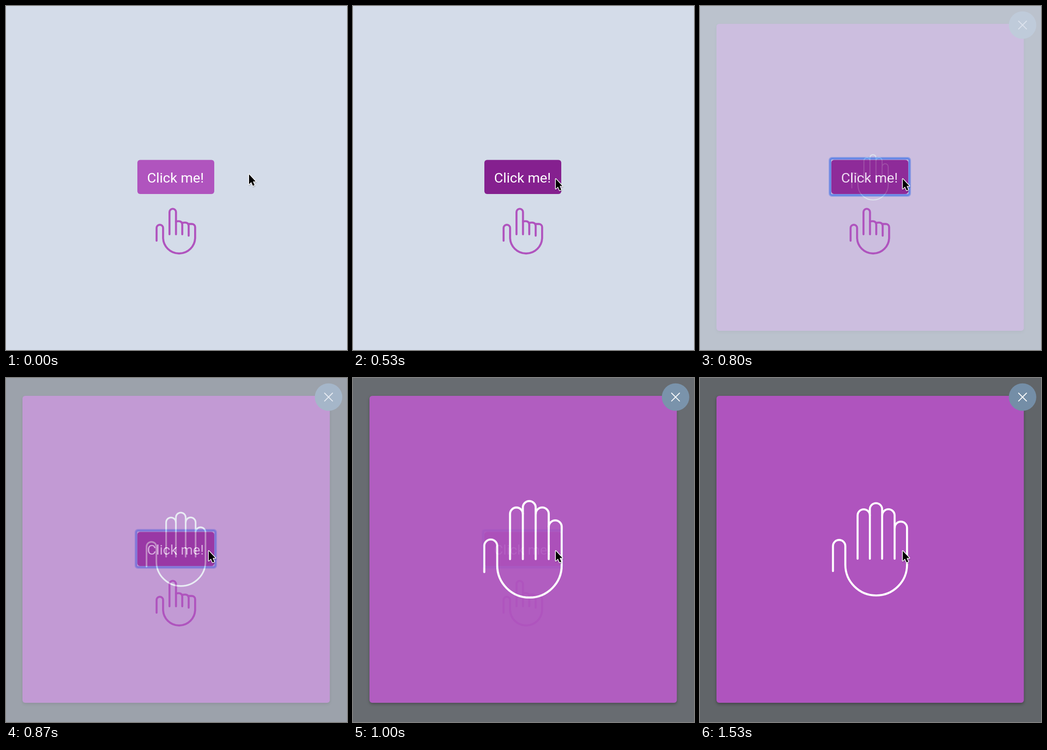
An HTML page that plays this animation: 745 px wide and 752 px high, repeating every 1.74 s.

```html
<!DOCTYPE html>
<html lang="en">
<head>
<meta charset="utf-8">
<title>Click me</title>
<style>
  html, body { margin: 0; width: 100%; height: 100%; overflow: hidden; background: #d4dce9; }
  svg { display: block; width: 745px; height: 752px; }
  .line { fill: none; stroke-linecap: round; stroke-linejoin: round; }
  #modal { filter: drop-shadow(0 3px 3px rgba(0, 0, 0, .32)); }
  #label { font: 400 30.4px Roboto, sans-serif; fill: #fff; }
</style>
</head>
<body>
<svg viewBox="0 0 745 752">
  <rect width="745" height="752" fill="#d4dce9"/>

  <g id="ring" class="line">
    <rect x="284" y="333" width="174" height="81" rx="4" stroke="#478ff2" stroke-opacity=".5" stroke-width="6"/>
    <rect x="284.5" y="333.5" width="173" height="80" rx="4" stroke="#478ff2" stroke-opacity=".85" stroke-width="3.4"/>
  </g>
  <rect id="button" x="287" y="336.5" width="168" height="74.5" rx="6"/>
  <text id="label" x="308.3" y="386">Click me!</text>

  <g class="line" stroke="#b054be" stroke-width="4.4">
    <path d="M329 513V485.3a7.1 7.1 0 0 1 14.2 0V506a35 35 0 0 0 70 0V483.5a7 7 0 0 0-7-7h-6.5"/>
    <path d="M357.2 499V450.5a7.1 7.1 0 0 1 14.2 0V499"/>
    <path d="M371.5 471c8-1.6 13.6 0 13.6 7V499"/>
    <path d="M385.5 474c8-1.6 13.6 0 13.6 7V502"/>
  </g>

  <g id="overlay">
    <rect width="745" height="752" fill="#616569"/>
    <rect id="modal" x="36" y="39" width="671.5" height="671" rx="6" fill="#af54be"/>
    <g id="hand" class="line" stroke="#fff" stroke-width="4.4">
      <path d="M290.5 422V367.5a13.5 13.5 0 0 1 27 0V408a67.4 67.4 0 0 0 134.8 0V327.5a13.5 13.5 0 0 0-27 0"/>
      <path d="M344.3 395V300.5a13.4 13.4 0 0 1 26.8 0"/>
      <path d="M371.1 395V287a13.4 13.4 0 0 1 26.8 0V395"/>
      <path d="M398 300.5a13.6 13.6 0 0 1 27.2 0V395"/>
    </g>
    <circle cx="704.7" cy="41.7" r="30" fill="#748ea7"/>
    <path class="line" d="M696 33l17.4 17.4M713.4 33L696 50.4" stroke="#fff" stroke-width="2"/>
  </g>

  <g id="cursor">
    <path d="M0 0V21.5L4.8 17L8.4 25L12 23.4L8.5 15.6H14.4Z" fill="#000" opacity=".22"
      transform="translate(.8 2)" style="filter:blur(1.3px)" stroke="#000" stroke-width="2"/>
    <path d="M0 0V21.5L4.8 17L8.4 25L12 23.4L8.5 15.6H14.4Z" fill="#000" stroke="#fff"
      stroke-width="3" stroke-linejoin="round" paint-order="stroke"/>
  </g>
</svg>
<script>
const LOOP = 1740, TICK = 1000 / 15;
const el = id => document.getElementById(id);
const [ring, button, overlay, hand, cursor] =
  ["ring", "button", "overlay", "hand", "cursor"].map(el);

const mix = (a, b, p) => a + (b - a) * p;
const span = (t, start, length) => Math.min(1, Math.max(0, (t - start) / length));

// CSS-style cubic-bezier, solved by bisection
function bezier(x1, y1, x2, y2) {
  const at = (a, b, u) => 3 * (1 - u) ** 2 * u * a + 3 * (1 - u) * u * u * b + u ** 3;
  return x => {
    if (x <= 0 || x >= 1) return x <= 0 ? 0 : 1;
    let lo = 0, hi = 1;
    for (let i = 0; i < 30; i++) {
      const mid = (lo + hi) / 2;
      if (at(x1, x2, mid) < x) lo = mid; else hi = mid;
    }
    return at(y1, y2, lo);
  };
}
const easeInOut = bezier(.42, 0, .58, 1);
const backOut = bezier(.175, .885, .32, 1.275);

const idle = [176, 84, 190], hover = [133, 32, 143];

function draw(t) {
  const move = easeInOut(span(t, 0, 470));
  cursor.setAttribute("transform", `translate(${mix(531, 443, move)} ${mix(368, 378, move)})`);

  const tint = easeInOut(span(t, 340, 180));
  button.setAttribute("fill", `rgb(${idle.map((c, i) => Math.round(mix(c, hover[i], tint)))})`);
  ring.setAttribute("visibility", t >= 600 ? "visible" : "hidden");

  overlay.setAttribute("opacity", easeInOut(span(t, 672, 400)));
  const s = backOut(span(t, 733, 600));
  hand.setAttribute("transform", `translate(371.5 374.5) scale(${s}) translate(-371.5 -374.5)`);
}

// The motion runs at 15 pictures a second
function run() {
  const t = performance.now() % LOOP;
  draw(Math.floor((t + 4) / TICK) * TICK);
  requestAnimationFrame(run);
}
run();
</script>
</body>
</html>
```
